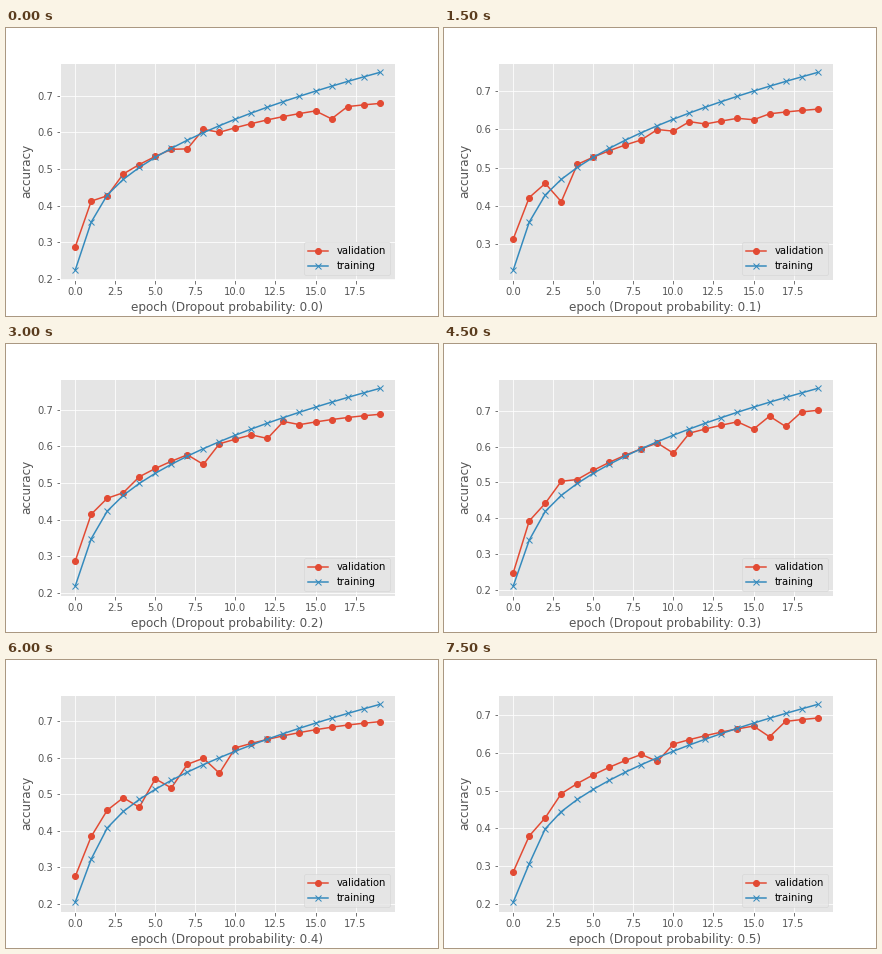
Write a matplotlib script that moves like this. It is 432 px wide and 288 px high and loops after 8000 ms.

```python
import numpy as np
import matplotlib.pyplot as plt
from matplotlib.animation import FuncAnimation

STEP = 500    # ms per animation frame
HOLD = 1500   # ms each dropout setting stays on screen
LOOP = 8000

EPOCHS = np.arange(20)
X = EPOCHS / EPOCHS[-1]

# One run per dropout probability: (first, last) accuracy of each curve
# and the epochs where validation strays most from its trend.
RUNS = [
    dict(train=(.2237, .7637), val=(.287, .679),
         jumps={2: -.028, 7: -.016, 8: .022, 16: -.028}),
    dict(train=(.2327, .7489), val=(.314, .653),
         jumps={3: -.075, 9: .015, 11: .015, 15: -.010}),
    dict(train=(.2188, .7575), val=(.287, .687),
         jumps={3: -.017, 8: -.042, 12: -.020, 13: .017}),
    dict(train=(.2100, .7622), val=(.247, .701),
         jumps={3: .025, 10: -.043, 15: -.029, 17: -.035}),
    dict(train=(.2046, .7462), val=(.275, .699),
         jumps={1: -.026, 4: -.054, 6: -.046, 9: -.056}),
    dict(train=(.2050, .7280), val=(.285, .692),
         jumps={1: -.035, 2: -.031, 9: -.033, 16: -.035}),
]


def training_curve(i):
    """Power-law learning curve; dropout slows the first epochs."""
    first, last = RUNS[i]["train"]
    drag = 1.2 + 10 * (i / 10) ** 3
    return first + (last - first) * X ** .42 * (1 - drag * np.exp(-2 * EPOCHS))


def validation_curve(i):
    """Rises faster than training, flattens earlier, and jumps about."""
    first, last = RUNS[i]["val"]
    curve = first + (last - first) * (X ** .4 + .23 * X * (1 - X))
    for epoch, jump in RUNS[i]["jumps"].items():
        curve[epoch] += jump
    return curve


plt.style.use("ggplot")
plt.rcParams.update({"font.family": "DejaVu Sans", "font.size": 10})

fig, ax = plt.subplots(figsize=(6, 4), dpi=72, facecolor="white")
fig.subplots_adjust(left=0.125, right=0.9, bottom=0.125, top=0.88)

val_line, = ax.plot(EPOCHS, validation_curve(0), "o-", label="validation")
train_line, = ax.plot(EPOCHS, training_curve(0), "x-", label="training")
ax.set_ylabel("accuracy")
ax.legend(loc="lower right")


def draw(frame):
    i = frame * STEP // HOLD
    val_line.set_ydata(validation_curve(i))
    train_line.set_ydata(training_curve(i))
    ax.relim()
    ax.autoscale_view()
    ax.set_xlabel(f"epoch (Dropout probability: {i / 10:.1f})")
    return val_line, train_line


anim = FuncAnimation(fig, draw, frames=LOOP // STEP, interval=STEP,
                     init_func=lambda: draw(0), repeat=True, blit=False)
plt.show()
```
